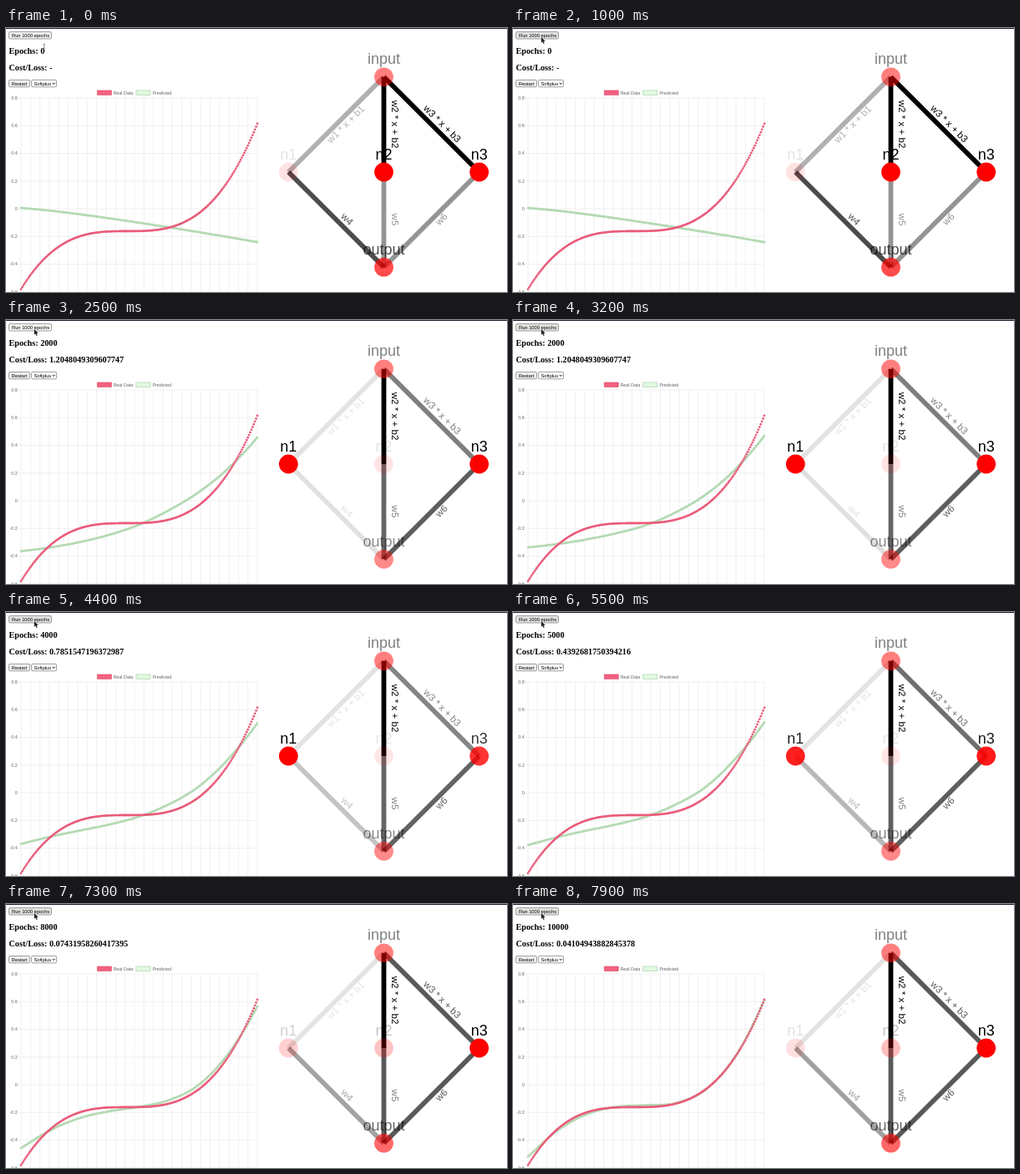
Animation, 600 px wide and 317 px high, one loop 8000 ms. Source, as an HTML page with a canvas:

```html
<!DOCTYPE html>
<html lang="en">
<head>
<meta charset="utf-8">
<title>Neural network training</title>
<style>
  html, body { margin: 0; width: 100%; height: 100%; overflow: hidden; background: #fff; }
  canvas { display: block; width: 600px; height: 317px; }
</style>
</head>
<body>
<canvas id="stage"></canvas>
<script>
const W = 600, H = 317, LOOP = 8000, STEP = 100;
const SANS = '"Liberation Sans", Arial, sans-serif';
const SERIF = '"Liberation Serif", Times, serif';
const canvas = document.getElementById('stage');
const ctx = canvas.getContext('2d');
const dpr = window.devicePixelRatio || 1;
canvas.width = W * dpr;
canvas.height = H * dpr;

const lerp = (a, b, p) => a + (b - a) * p;
const mix = (a, b, p) => a.map((v, i) => lerp(v, b[i], p));
const clamp = v => Math.min(1, Math.max(0, v));
const easeOutQuart = p => 1 - (1 - p) ** 4;

// Plot area
const LEFT = 18, RIGHT = 301, TOP = 84, UNIT = 166.3, POINTS = 200;
const KNOTS = 9;

// Heights of the predicted curve at evenly spaced x, per training stage
const curves = [
  Array.from({ length: KNOTS }, (_, i) => 216 + 41 * (i / 8) ** 1.2),
  [278.7, 274, 267.3, 258.2, 245.6, 228, 206.5, 178.3, 141.4],
  [273, 269, 263.3, 256, 246.3, 231, 210, 180, 139],
  [279, 269.8, 262.3, 255, 245.5, 231, 210, 177, 133],
  [281, 271, 262.3, 255, 245.8, 231.5, 211, 177, 132],
  [304, 272, 252, 243.2, 241.5, 239.3, 223.5, 184, 114.5]
];

// Opacities per stage: n1, n2, n3, output, w1, w3, w4, w5, w6
const nets = [
  [.11, 1, 1, .7, .31, 1, .7, .42, .42],
  [.11, 1, .45, .46, .13, .69, .13, .69, .69],
  [1, .11, 1, .46, .11, .5, .12, .6, .63],
  [1, .1, .8, .46, .11, .48, .23, .6, .61],
  [.75, .1, 1, .48, .11, .65, .33, .65, .65],
  [.12, .25, 1, .6, .11, .65, .37, .65, .65]
];

const runs = [
  { at: 0, epoch: 0, loss: '-', stage: 0 },
  { at: 1250, epoch: 1000, loss: '1.3544112007281064', stage: 1 },
  { at: 2450, epoch: 2000, loss: '1.2048049309607747', stage: 2 },
  { at: 3350, epoch: 3000, loss: '1.0217730482615938', stage: 2.5 },
  { at: 4050, epoch: 4000, loss: '0.7851547196372987', stage: 3 },
  { at: 5050, epoch: 5000, loss: '0.4392681750394216', stage: 3.5 },
  { at: 5950, epoch: 6000, loss: '0.19697364578031884', stage: 4 },
  { at: 6950, epoch: 7000, loss: '0.11862047359108246', stage: 4.3 },
  { at: 7150, epoch: 8000, loss: '0.07431958260417395', stage: 4.9 },
  { at: 7350, epoch: 9000, loss: '0.05386201947350618', stage: 5 },
  { at: 7650, epoch: 10000, loss: '0.04104943882845378', stage: 5 }
];

function pick(table, stage) {
  const i = Math.floor(stage);
  return mix(table[i], table[Math.min(i + 1, table.length - 1)], stage - i);
}

// Each run starts from whatever the chart shows at that moment
function curveAt(t) {
  let cur = curves[0];
  runs.forEach((run, i) => {
    if (!i || t < run.at) return;
    const end = i + 1 < runs.length ? Math.min(t, runs[i + 1].at) : t;
    cur = mix(cur, pick(curves, run.stage), easeOutQuart(clamp((end - run.at) / 1000)));
  });
  return cur;
}

function spline(k, p) {
  const s = p * (KNOTS - 1), i = Math.min(KNOTS - 2, Math.floor(s)), f = s - i;
  const b = k[i], c = k[i + 1];
  const a = i ? k[i - 1] : 2 * b - c;
  const d = i + 2 < KNOTS ? k[i + 2] : 3 * c - 3 * b + a;
  return b + f / 2 * (c - a + f * (2 * a - 5 * b + 4 * c - d + f * (3 * (b - c) + d - a)));
}

const realY = x => 244 - 3.4e-5 * (x - 145) ** 3;

function text(str, x, y, font, color, align = 'left', base = 'alphabetic') {
  ctx.font = font;
  ctx.fillStyle = color;
  ctx.textAlign = align;
  ctx.textBaseline = base;
  ctx.fillText(str, x, y);
}

function line(x1, y1, x2, y2, color, width) {
  ctx.strokeStyle = color;
  ctx.lineWidth = width;
  ctx.beginPath();
  ctx.moveTo(x1, y1);
  ctx.lineTo(x2, y2);
  ctx.stroke();
}

function box(x, y, w, h, r, fill, border, width) {
  ctx.beginPath();
  ctx.roundRect(x, y, w, h, r);
  ctx.fillStyle = fill;
  ctx.fill();
  ctx.strokeStyle = border;
  ctx.lineWidth = width;
  ctx.stroke();
}

function drawControls(run, hover, pressed) {
  const small = '5.75px ' + SANS, head = 'bold 10.2px ' + SERIF;
  ctx.fillStyle = '#1d1a2b';
  ctx.fillRect(0, 0, W, 1);
  box(3.5, 4.6, 51, 8.4, 1.5, pressed ? '#f5f5f5' : hover ? '#e2e2e2' : '#efefef', '#767676', .7);
  text('Run 1000 epochs', 7, 10.9, small, '#000');
  text('Epochs: ' + run.epoch, 3.5, 31, head, '#000');
  text('Cost/Loss: ' + run.loss, 3.5, 51.2, head, '#000');
  box(3.5, 62.4, 25, 8.4, 1.5, '#efefef', '#767676', .7);
  text('Restart', 6.8, 68.7, small, '#000');
  box(30.5, 62.4, 30, 8.4, 1.5, '#fff', '#767676', .7);
  text('Softplus', 33.4, 68.7, small, '#000');
  ctx.strokeStyle = '#000';
  ctx.lineWidth = .9;
  ctx.beginPath();
  ctx.moveTo(55.6, 65.8);
  ctx.lineTo(57.2, 67.5);
  ctx.lineTo(58.8, 65.8);
  ctx.stroke();
}

function drawChart(knots) {
  const small = '5.4px ' + SANS, grid = '#e6e6e6';
  box(109.3, 75, 17, 5.4, 0, '#f4607f', '#e0506f', .7);
  text('Real Data', 128.4, 79.6, small, '#666');
  box(155.8, 75, 17, 5.4, 0, '#e4f8e4', '#b5dcb5', .9);
  text('Predicted', 175.4, 79.6, small, '#666');

  for (let i = 0; i <= 25; i++) {
    const x = lerp(LEFT, RIGHT, i / 25);
    line(x, TOP, x, H, grid, .6);
  }
  for (let i = 0; i < 8; i++) {
    const v = .8 - i * .2, y = TOP + i * .2 * UNIT;
    line(LEFT - 4, y, RIGHT, y, grid, .6);
    text(i === 4 ? '0' : v.toFixed(1), 13.8, y + .4, small, '#666', 'right', 'middle');
  }

  ctx.save();
  ctx.strokeStyle = '#b4dab4';
  ctx.lineWidth = 2.8;
  ctx.lineCap = 'round';
  ctx.beginPath();
  for (let i = 0; i < POINTS; i++) {
    const p = i / (POINTS - 1);
    ctx.lineTo(lerp(LEFT, RIGHT, p), spline(knots, p));
  }
  ctx.stroke();
  ctx.restore();

  ctx.fillStyle = '#ea5b7a';
  for (let i = 0; i < POINTS; i++) {
    const x = lerp(LEFT, RIGHT, i / (POINTS - 1));
    ctx.beginPath();
    ctx.arc(x, realY(x), 1.4, 0, 7);
    ctx.fill();
  }
}

const CX = 452.5, CY = 173, ARM = 114.2;

function drawNet([n1, n2, n3, out, w1, w3, w4, w5, w6]) {
  const nodes = [
    ['input', CX, CY - ARM, .5],
    ['n1', CX - ARM, CY, n1],
    ['n2', CX, CY, n2],
    ['n3', CX + ARM, CY, n3],
    ['output', CX, CY + ARM, out]
  ];
  // from, to, label, opacity, label centre, quarter turns / 2
  const edges = [
    [0, 1, 'w1 * x + b1', w1, 407.5, 116, -1],
    [0, 2, 'w2 * x + b2', 1, 465, 115.5, 2],
    [0, 3, 'w3 * x + b3', w3, 522, 115.5, 1],
    [1, 4, 'w4', w4, 408, 230, 1],
    [2, 4, 'w5', w5, 465, 230, 2],
    [3, 4, 'w6', w6, 522, 230, -1]
  ];
  for (const [from, to, label, alpha, x, y, turn] of edges) {
    const [, ax, ay] = nodes[from], [, bx, by] = nodes[to];
    ctx.save();
    ctx.globalAlpha = alpha;
    line(ax, ay, bx, by, '#000', 5.8);
    ctx.globalAlpha = label === 'w5' ? Math.min(alpha, .5) : alpha;
    ctx.translate(x, y);
    ctx.rotate(turn * Math.PI / 4);
    text(label, 0, 0, '11.6px ' + SANS, '#000', 'center', 'middle');
    ctx.restore();
  }
  for (const [label, x, y, alpha] of nodes) {
    ctx.save();
    ctx.globalAlpha = alpha;
    ctx.fillStyle = '#f00';
    ctx.beginPath();
    ctx.arc(x, y, 11.4, 0, 7);
    ctx.fill();
    text(label, x, y - 15.4, '18px ' + SANS, '#000', 'center');
    ctx.restore();
  }
}

function drawPointer(x, y) {
  if (y > 19) {
    line(x, y - 4, x, y + 4, '#555', .7);
    line(x - 1.3, y - 4, x + 1.3, y - 4, '#555', .6);
    line(x - 1.3, y + 4, x + 1.3, y + 4, '#555', .6);
    return;
  }
  ctx.save();
  ctx.translate(x, y);
  ctx.beginPath();
  for (const [px, py] of [[0, 0], [0, 7], [1.6, 5.6], [2.7, 8.2], [3.9, 7.7], [2.8, 5.2], [4.9, 5.1]]) ctx.lineTo(px, py);
  ctx.closePath();
  ctx.fillStyle = '#222';
  ctx.strokeStyle = '#fff';
  ctx.lineWidth = .8;
  ctx.stroke();
  ctx.fill();
  ctx.restore();
}

function draw(t) {
  const run = runs.filter(r => r.at <= t).pop();
  const p = clamp(t / 900), move = p * p * (3 - 2 * p);
  const x = lerp(45.8, 33.8, move), y = lerp(23.5, 10.8, move);
  ctx.setTransform(dpr, 0, 0, dpr, 0, 0);
  ctx.fillStyle = '#fff';
  ctx.fillRect(0, 0, W, H);
  drawControls(run, y < 13, run.epoch > 0 && t - run.at < STEP);
  drawChart(curveAt(t));
  drawNet(pick(nets, run.stage));
  drawPointer(x, y);
}

const start = performance.now();
function tick() {
  const t = (performance.now() - start) % LOOP;
  draw(Math.floor(t / STEP) * STEP);
  requestAnimationFrame(tick);
}
tick();
</script>
</body>
</html>
```
